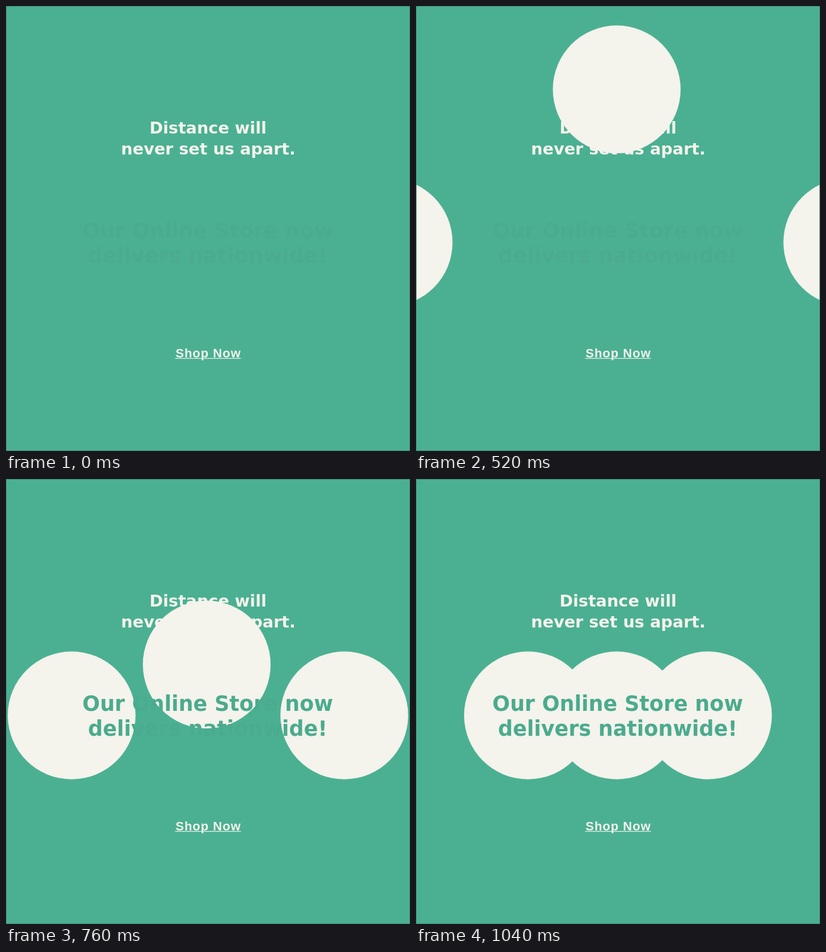
An HTML page for the animation above (3480 ms loop, 713 px wide and 785 px high).

```html
<!DOCTYPE html>
<html lang="en">
<head>
<meta charset="utf-8">
<title>Nationwide delivery</title>
<style>
  html, body { margin: 0; width: 100%; height: 100%; overflow: hidden; background: #4bb092; }
  svg { display: block; width: 100%; height: 100%; }
  text { font-family: "DejaVu Sans", sans-serif; font-weight: bold; text-anchor: middle; }
  .cream { fill: #f4f3ec; }
  .headline { font-size: 28.7px; }
  .offer { font-size: 36.5px; fill: #4bab8e; }
  .button { font: bold 22px "Liberation Sans", Arial, sans-serif; letter-spacing: 1px; }
</style>
</head>
<body>
<svg viewBox="0 0 713 785">
  <rect width="713" height="785" fill="#4bb092"/>
  <g class="cream headline">
    <text x="356.5" y="224.5">Distance will</text>
    <text x="357" y="261.5">never set us apart.</text>
  </g>
  <g class="cream">
    <circle id="left" cy="417" r="112.75"/>
    <circle id="right" cy="417" r="112.75"/>
    <circle id="middle" cx="354.25" r="112.75"/>
  </g>
  <g class="offer">
    <text x="356" y="409">Our Online Store now</text>
    <text x="356" y="453">delivers nationwide!</text>
  </g>
  <text class="cream button" x="357" y="619.5">Shop Now</text>
  <rect class="cream" x="298.5" y="621" width="116" height="1.2"/>
  <rect x=".5" y=".5" width="712" height="784" fill="none" stroke="#3f8571"/>
</svg>
<script>
  const LOOP = 3480, STEP = 40, REST_Y = 417;
  // Fall of the middle circle: time (ms), centre y, speed (px/ms)
  const fall = [
    [280, -99, 1.07], [440, 69, 1], [600, 218, .82],
    [760, 327.3, .6], [880, 388, .36], [1040, REST_Y, 0]
  ];
  const byId = id => document.getElementById(id);
  const left = byId('left'), middle = byId('middle'), right = byId('right');

  function heightAt(t) {
    if (t < 280) return -200;
    const i = fall.findIndex(key => key[0] > t);
    if (i < 0) return REST_Y;
    const [t0, y0, v0] = fall[i - 1], [t1, y1, v1] = fall[i];
    const d = t1 - t0, u = (t - t0) / d, w = 1 - u;
    return w * w * ((1 + 2 * u) * y0 + u * d * v0)
         + u * u * ((3 - 2 * u) * y1 - w * d * v1);
  }

  function draw(now) {
    const t = Math.floor(now % LOOP / STEP) * STEP;
    const y = heightAt(t);
    const offset = (REST_Y - y) * .911;
    middle.setAttribute('cy', y);
    left.setAttribute('cx', 197.6 - offset);
    right.setAttribute('cx', 515.3 + offset);
  }

  let start;
  function tick(now) {
    start ??= now;
    draw(now - start);
    requestAnimationFrame(tick);
  }
  draw(0);
  requestAnimationFrame(tick);
</script>
</body>
</html>
```
